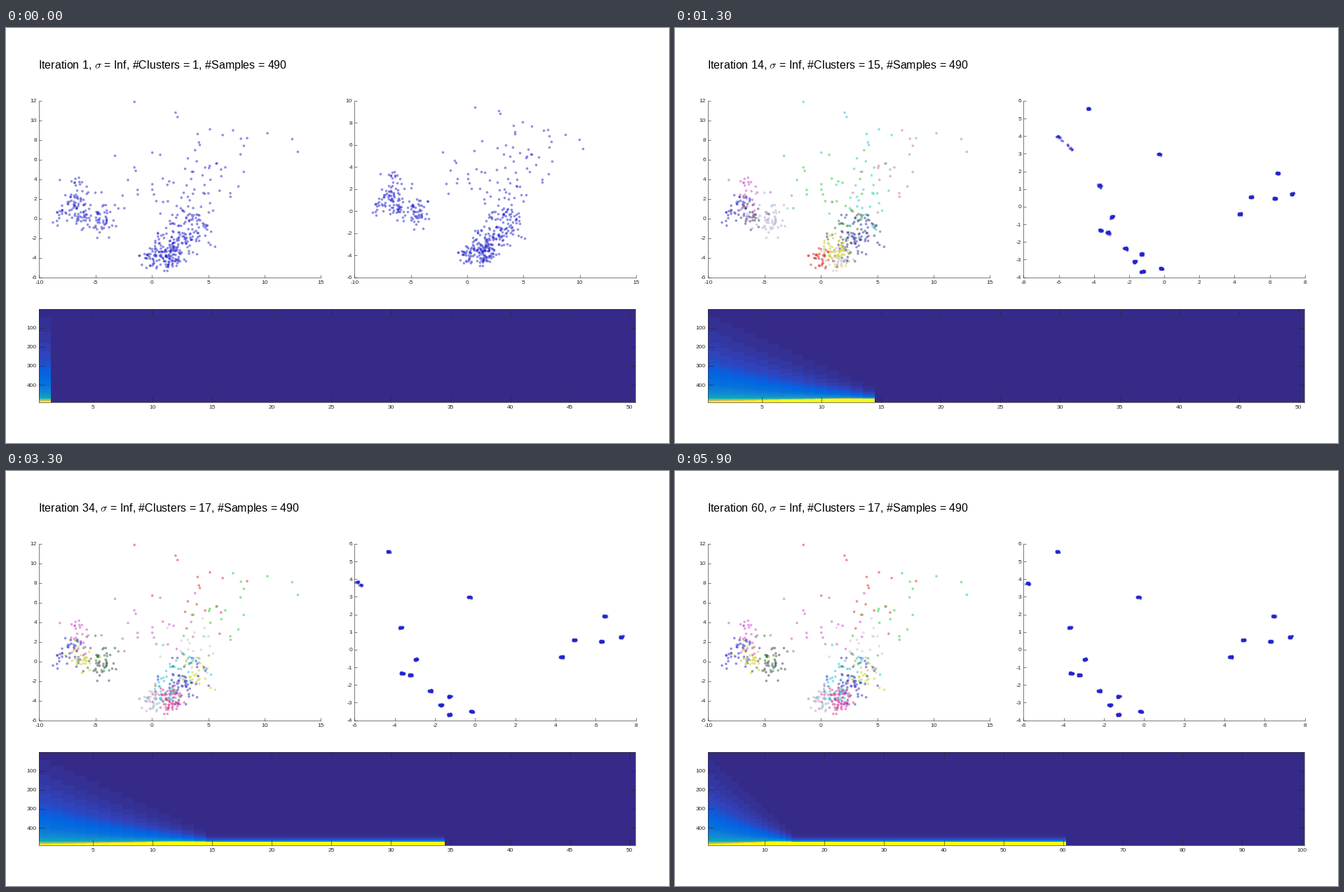
A matplotlib script for the animation above (6 s loop, 946x592 px).

```python
import numpy as np
import matplotlib.pyplot as plt
from matplotlib.animation import FuncAnimation
from matplotlib.colors import LinearSegmentedColormap

W, H, DPI = 946, 592, 64
PT = 72 / DPI  # points per pixel
INK = "#262626"
BLUE = "#2323cd"
ROWS = 490

plt.rcParams.update({"font.family": "Liberation Sans", "mathtext.fontset": "cm"})

# Where each cluster comes to rest
REST = np.array([
    (-4.30, 5.56), (-5.80, 3.75), (-3.70, 1.26), (-2.94, -0.55), (-3.64, -1.33),
    (-3.22, -1.43), (-2.23, -2.33), (-1.71, -3.14), (-1.27, -2.65), (-1.27, -3.68),
    (-0.16, -3.48), (-0.28, 2.97), (4.30, -0.41), (4.94, 0.56), (6.29, 0.46),
    (6.45, 1.90), (7.28, 0.72),
])
MIRROR = np.array([-1, 1])

# A few far-out points of the first two clusters
FAR = [
    [(-1.55, 11.9), (2.1, 10.8), (5.15, 9.1), (8.45, 8.2)],
    [(7.2, 9.0), (10.25, 8.7), (12.45, 8.1), (12.95, 6.8)],
]

HUES = dict(r="#dd2424", g="#24cc24", b=BLUE, y="#cccc24", v="#cc44cc",
            c="#24c0d0", d="#247a24", p="#443366", l="#b0a8cc", s="#cc7070",
            k="#d83088", w="#c4c4c4", n="#2a2aa0", t="#24ccbb")

# First iteration of each colouring, one letter per cluster
COLOURINGS = {
    1: "b" * 17,
    3: "b" * 12 + "r" * 5,
    6: "gggrryyyyyrgcbvbb",
    9: "pggssssyyrrpcdvlb",
    12: "cstdnnnyywrgllpvb",
    21: "rgwcynbkcklvpdyvb",
}

PARULA = LinearSegmentedColormap.from_list("parula", [
    (0, "#352a87"), (0.06, "#3243ba"), (0.11, "#0f5cdd"), (0.14, "#0268e1"),
    (0.27, "#1389d3"), (0.40, "#07a9c2"), (0.62, "#71bf80"), (0.81, "#d1bb59"),
    (0.90, "#fec12f"), (1, "#f9fb0e")], N=64)


def make_points(rng):
    """Sample the clusters: tight at the bottom and left, loose at the top."""
    x, y = (REST * MIRROR).T
    spread = (0.5 + 0.16 * (y + 4)) * np.clip(1.2 + 0.08 * x, 0, 1.1)
    share = np.cumsum(spread ** -0.5)
    owner = np.searchsorted(share / share[-1], (np.arange(ROWS) + 0.5) / ROWS)
    noise = np.clip(rng.normal(size=(ROWS, 2)), -2, 2)
    points = REST[owner] * MIRROR * (1, 1.15) + noise * spread[owner, None]
    for i, far in enumerate(FAR):
        first = np.argmax(owner == i)
        points[first:first + len(far)] = far
    return points, owner


def spectrum():
    """Sorted eigenvalues, one column per iteration, as colour levels."""
    row = np.arange(1, ROWS + 1)[:, None]
    col = np.arange(100)[None, :]
    start = np.minimum(44 + 28 * col, 436)
    full = np.maximum(486 - 1.4 * col, 471)
    w = np.clip((row - start) / (full - start), 0, 1)
    w = w ** (1 + 0.04 * np.minimum(col, 10))
    level = np.interp(w, [0, .25, .5, .65, .8, .9, .96, 1],
                      [1, 2.5, 5, 8, 12, 18, 26, 63])
    return np.where(row < start, 0, np.floor(level))


rng = np.random.default_rng(12)
start, owner = make_points(rng)
goal = REST[owner] * MIRROR
chained = ((owner > 0) & (owner < 10))[:, None]
toward = np.where(chained, REST[np.minimum(owner + 1, 16)] * MIRROR - goal, 0)
lag = 0.85 * rng.random((ROWS, 1)) ** 2.2
jitter = rng.uniform(-1, 1, (ROWS, 2)) * (0.09, 0.055)
side = rng.choice([-1, 1], (ROWS, 1)) * (owner == 1)[:, None]
pull = 0.2 + 0.022 * np.hypot(*(start - goal).T)[:, None]
levels = spectrum()


def shifted(n):
    """Mean-shifted points after n iterations."""
    ramp = min(1, (n - 1) / 8)
    keep = (1 - pull) ** (n * (1 + 0.06 * (n - 1)))
    trail = ramp * np.exp(-max(n - 9, 0) / 2.5)
    split = ramp * 0.28 * np.exp(-(max(n, 9) - 14) / 16)
    pos = goal + (start - goal) * keep + toward * lag * trail
    pos = pos + side * split * np.array([1, 0.9])
    if n >= 4:  # the projection changes sign
        pos = pos * MIRROR
    return pos + jitter * min(1, n / 5)


def add_axes(left, top, right, bottom, tick, boxed=False):
    ax = fig.add_axes([left / W, 1 - bottom / H, (right - left) / W, (bottom - top) / H])
    ax.tick_params(direction="in", length=tick * PT, width=0.6 * PT, color=INK,
                   labelcolor=INK, labelsize=8.4 * PT, top=boxed, right=boxed)
    ax.tick_params(axis="x", pad=4.8 * PT)
    ax.tick_params(axis="y", pad=3.4 * PT)
    for name, spine in ax.spines.items():
        spine.set(color=INK, linewidth=0.6 * PT,
                  visible=boxed or name in ("left", "bottom"))
    ax.patch.set_visible(False)
    return ax


def set_scale(axis, low, high, step):
    ticks = range(low, high + 1, step)
    axis.set_ticks(ticks, labels=[str(t) for t in ticks])
    axis.axes.set(**{axis.axis_name + "lim": (low, high)})


def fit_scale(axis, values):
    """Round the limits outwards to whole ticks."""
    low, high = values.min(), values.max()
    span = high - low
    step = 1 if span < 10 else 2 if span < 16 else 5
    set_scale(axis, int(np.floor(low / step)) * step,
              int(np.ceil(high / step)) * step, step)


def dots(ax, xy):
    return ax.scatter(*xy.T, s=(3.6 * PT) ** 2, c=BLUE, alpha=0.5,
                      linewidths=0, clip_on=False, zorder=3)


fig = plt.figure(figsize=(W / DPI, H / DPI), dpi=DPI, facecolor="white")
title = fig.text(46.5 / W, 1 - 58 / H, "", fontsize=16 * PT, color="black",
                 va="baseline")

data_ax = add_axes(47.4, 104, 449.4, 355.6, 4)
set_scale(data_ax.xaxis, -10, 15, 5)
set_scale(data_ax.yaxis, -6, 12, 2)
data_dots = dots(data_ax, start)

shift_ax = add_axes(497.4, 104, 898.8, 355.6, 4)
shift_dots = dots(shift_ax, start)

heat_ax = add_axes(47.4, 400.6, 898.4, 533.6, 8, boxed=True)
heat = heat_ax.imshow(levels, cmap=PARULA, vmin=0, vmax=63, aspect="auto",
                      interpolation="nearest")


def update(frame):
    n = frame + 1
    count = int(np.interp(n, [1, 9, 14, 18], [1, 10, 15, 17]))
    title.set_text(f"Iteration {n}, $\\sigma$ = Inf, #Clusters = {count}, "
                   f"#Samples = {ROWS}")

    letters = COLOURINGS[max(k for k in COLOURINGS if k <= n)]
    data_dots.set_facecolor([HUES[letters[i]] for i in owner])

    pos = shifted(n)
    fit_scale(shift_ax.xaxis, pos[:, 0])
    fit_scale(shift_ax.yaxis, pos[:, 1])
    shift_dots.set_offsets(pos)

    cols = 50 if n <= 50 else 100
    shown = levels[:, :cols].copy()
    shown[:, n:] = 0
    heat.set_data(shown)
    heat.set_extent((0.5, cols + 0.5, ROWS + 0.5, 0.5))
    set_scale(heat_ax.xaxis, cols // 10, cols, cols // 10)
    set_scale(heat_ax.yaxis, 100, 400, 100)
    heat_ax.set(xlim=(0.5, cols + 0.5), ylim=(ROWS + 0.5, 0.5))
    return title, data_dots, shift_dots, heat


anim = FuncAnimation(fig, update, frames=60, interval=100, repeat=True)
plt.show()
```
